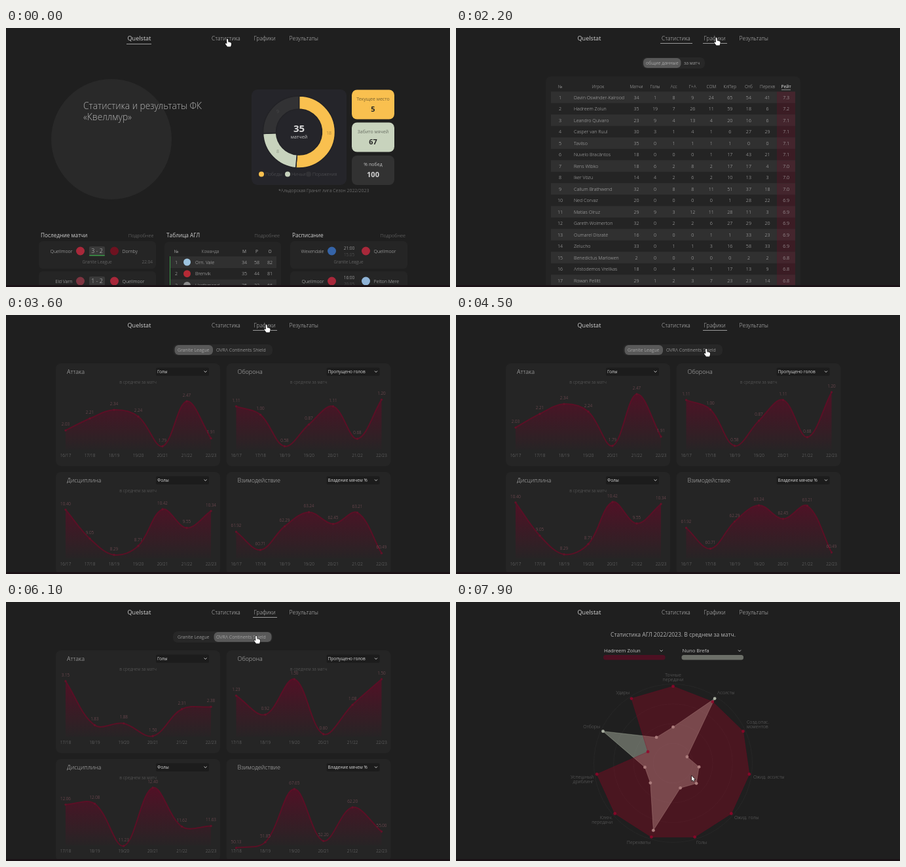
Recreate the animation shown at these times as an HTML page with a canvas. Size 678x396 px, loop 8 s.

```html
<!DOCTYPE html>
<html lang="ru">
<head>
<meta charset="utf-8">
<title>Quelstat</title>
<style>
  html, body { margin: 0; width: 100%; height: 100%; overflow: hidden; background: #1f1f1f; }
  canvas { display: block; width: 678px; height: 396px; }
</style>
</head>
<body>
<canvas></canvas>
<script>
const W = 678, H = 396, LOOP = 8000;
const canvas = document.querySelector('canvas');
const ctx = canvas.getContext('2d');
const dpr = window.devicePixelRatio || 1;
canvas.width = W * dpr;
canvas.height = H * dpr;

const CLUB = 'Quellmoor', LEAGUE = 'Granite League';
const GOLD = '#f9c04f', SAGE = '#c8d3bd', RED = '#a8283a';

const clamp = v => Math.max(0, Math.min(1, v));
const progress = (t, start, length) => clamp((t - start) / length);
const mix = (a, b, k) => a + (b - a) * k;
const outQuart = p => 1 - (1 - p) ** 4;
const inOut = p => p * p * (3 - 2 * p);

function text(str, x, y, size = 7.1, color = '#b8b8b8', align = 'left', weight = 300) {
  ctx.font = `${weight} ${size}px "Open Sans", "Noto Sans", sans-serif`;
  ctx.textAlign = align;
  ctx.textBaseline = 'alphabetic';
  ctx.fillStyle = color;
  ctx.fillText(str, x, y + size * 0.37);
}
const centered = (str, x, y, size, color, weight) => text(str, x, y, size, color, 'center', weight);

function box(x1, y1, x2, y2, color, radius = 0) {
  ctx.fillStyle = color;
  ctx.beginPath();
  ctx.roundRect(x1, y1, x2 - x1, y2 - y1, radius);
  ctx.fill();
}
function dot(x, y, r, color) {
  ctx.fillStyle = color;
  ctx.beginPath();
  ctx.arc(x, y, r, 0, Math.PI * 2);
  ctx.fill();
}
function ring(x, y, r, color, width) {
  ctx.strokeStyle = color;
  ctx.lineWidth = width;
  ctx.beginPath();
  ctx.arc(x, y, r, 0, Math.PI * 2);
  ctx.stroke();
}
function chevron(x, y) {
  ctx.strokeStyle = '#ccc';
  ctx.lineWidth = 1;
  ctx.beginPath();
  ctx.moveTo(x - 2, y - 1);
  ctx.lineTo(x, y + 1);
  ctx.lineTo(x + 2, y - 1);
  ctx.stroke();
}

/* ---------- header and pointer ---------- */

function drawNav(t) {
  text('Quelstat', 185.5, 15.7, 9.1, '#d2d2d2', 'left', 400);
  text('Статистика', 314, 15.7, 8.5, '#c6c6c6');
  text('Графики', 378.5, 15.7, 8.5, '#c6c6c6');
  text('Результаты', 432.5, 15.7, 8.5, '#c6c6c6');
  const underline = (x1, x2, y, start, end) => {
    if (t < start || t >= end) return;
    const half = (x2 - x1) / 2 * progress(t, start, 200);
    const mid = (x1 + x2) / 2;
    box(mid - half, y, mid + half, y + 1, '#9a9a9a');
  };
  underline(184, 222, 24, -200, 850);
  underline(312, 361, 23, 100, 3250);
  underline(377, 414, 23, 1950, 7310);
  underline(184, 222, 24, 6900, 7310);
}

const STOPS = [
  { start: 1550, end: 2200, x: 397.5, y: 14.5 },
  { start: 4050, end: 4500, x: 382, y: 51.5 },
  { start: 6250, end: 7100, x: 203, y: 16 },
];
const HAND = [[-1, 1], [0, 0], [1, 1], [1.4, 5], [4, 5.3], [6, 6.5], [6, 9], [5, 12], [0, 12], [-3, 8], [-2.6, 6.8], [-0.6, 7.6]];
const ARROW = [[0, 0], [0, 7.2], [1.6, 5.8], [2.7, 8.2], [3.8, 7.7], [2.8, 5.4], [5, 5.2]];

function drawPointer(t) {
  let x = 338, y = 16.5, shape = HAND;
  for (const s of STOPS) {
    const p = progress(t, s.start, s.end - s.start);
    x = mix(x, s.x, inOut(p));
    y = mix(y, s.y, inOut(p));
    if (p > 0.2 && p < 0.8) shape = ARROW;
  }
  if (t >= 7310) [x, y, shape] = [360, 266, ARROW];
  for (const click of [600, 3000, 5100]) {
    if (t >= click && t < click + 290) ring(x + 0.3, y + 0.5, 16.3, '#850b1c', 1.7);
  }
  ctx.beginPath();
  shape.forEach(([dx, dy]) => ctx.lineTo(x + dx, y + dy));
  ctx.closePath();
  ctx.lineWidth = 1.2;
  ctx.strokeStyle = '#111';
  ctx.stroke();
  ctx.fillStyle = '#fff';
  ctx.fill();
}

/* ---------- dashboard ---------- */

function drawDonut() {
  const cx = 447.5, cy = 159;
  let angle = -Math.PI / 2;
  box(375, 94, 520, 240, '#25252a', 9);
  for (const [count, color] of [[18, GOLD], [8, SAGE], [9, '#323234']]) {
    const end = angle + count / 35 * Math.PI * 2;
    ctx.beginPath();
    ctx.arc(cx, cy, 55, angle, end);
    ctx.arc(cx, cy, 35, end, angle, true);
    ctx.closePath();
    ctx.fillStyle = color;
    ctx.fill();
    ctx.strokeStyle = '#222226';
    ctx.lineWidth = 1.5;
    ctx.stroke();
    angle = end;
  }
  centered('18', 493, 160, 7, '#8a6c35');
  centered('8', 415, 188.5, 7, '#6c7266');
  centered('9', 415, 127, 7, '#555');
  centered('35', cx, 153, 15, '#d8d8d8', 700);
  centered('матчей', cx, 166, 7.1, '#c4c4c4', 400);
  [[390, GOLD, 'Победы'], [430, SAGE, 'Ничьи'], [462, '#323236', 'Поражения']].forEach(([x, color, name]) => {
    dot(x, 223.5, 4, color);
    text(name, x + 6, 223.5, 7, '#58585c');
  });
}

function statCard(y, color, label, value, labelColor, valueColor) {
  box(528, y, 593, y + 45, color, 8);
  centered(label, 560.5, y + 13.5, 7, labelColor, 400);
  centered(value, 560.5, y + 29, 11, valueColor, 700);
}

function matchCard(x, y, home, away, homeColor, awayColor) {
  box(x, y, x + 179, y + 42, '#252525', 6);
  text(home, x + 51.5, y + 15.5, 7.1, '#c8c8c8', 'right');
  text(away, x + 127.5, y + 15.5, 7.1, '#c8c8c8');
  dot(x + 63.5, y + 15, 6.5, homeColor);
  dot(x + 115.5, y + 15, 6.5, awayColor);
  centered(LEAGUE, x + 89, y + 32, 6.6, '#808080');
}
function score(y, value) {
  box(127, y - 7, 151, y + 7, '#3a3a3a', 2);
  box(127, y + 6, 151, y + 7.6, '#3c9a48', 1);
  centered(value, 139, y - 0.5, 8.8, '#d0d0d0');
}
function kickoff(y, time, date) {
  centered(time, 524, y - 5, 6.6, '#cccccc');
  centered(date, 524, y + 5, 6.4, '#626262');
}

function drawDashboard() {
  dot(161, 170, 92, '#292929');
  text('Статистика и результаты ФК', 118, 118.5, 13.8, '#b4b4b4');
  text('«Квеллмур»', 118, 136, 13.8, '#b4b4b4');
  drawDonut();
  statCard(94.5, GOLD, 'Текущее место', '5', '#77602f', '#242424');
  statCard(144.5, SAGE, 'Забито мячей', '67', '#6a7064', '#242424');
  statCard(195, '#323232', '% побед', '100', '#c0c0c0', '#d4d4d4');
  text('*Альдорская Гранит лига Сезон 2022/2023', 416, 248, 6.9, '#8e8e8e');

  [[53, 225.5, 'Последние матчи'], [245, 418, 'Таблица АГЛ'], [437, 610, 'Расписание']].forEach(([x, right, title]) => {
    text(title, x, 317, 8.3, '#cfcfcf', 'left', 400);
    text('Подробнее', right, 317.5, 7.3, '#787878', 'right');
  });

  matchCard(50, 326, CLUB, 'Dornby', RED, '#6e1220');
  matchCard(50, 372, 'Eld Varn', CLUB, '#7d3440', RED);
  score(341, '3 - 2');
  score(387, '1 - 2');
  text('22.04', 224, 358, 6.6, '#808080', 'right');
  matchCard(434, 326, 'Wexendale', CLUB, '#3564a8', RED);
  matchCard(434, 372, CLUB, 'Pelton Mere', RED, '#8fb3d6');
  kickoff(341.5, '21:00', '15.05');
  kickoff(387, '16:00', '20.05');

  box(242, 327, 420, 410, '#242424', 6);
  const cols = [260, 364, 383, 403];
  ['№', 'М', 'Р', 'О'].forEach((s, i) => centered(s, cols[i], 342, 6.6, '#a8a8a8', 400));
  centered('Команда', 312, 342, 6.6, '#b0b0b0');
  [['Orn. Vale', '#9cc3df', '34 58 82'], ['Brenvik', '#b52a35', '35 44 81'], ['Harthmond', '#8d8d8d', '35 32 66']].forEach(([team, color, points], i) => {
    const y = 358 + i * 17.7;
    if (i % 2 === 0) box(250, y - 8.8, 413, y + 8.9, '#303030');
    dot(276.5, y, 5.5, color);
    text(team, 289, y, 7.1, '#c8c8c8');
    [i + 1, ...points.split(' ')].forEach((v, c) => centered(v, cols[c], y, 7.1, '#c8c8c8'));
  });
  box(250, 349, 251, 396, '#3c9a48');
}

/* ---------- player table ---------- */

// name | matches, goals, assists, big chances, key passes, tackles, interceptions, rating
const PLAYERS = `Davin Oswinder-Kalrood|34 1 8 24 65 54 41 7.3
Hadreem Zolun|35 19 7 11 59 18 6 7.2
Leandro Quivaro|23 9 4 4 20 16 6 7.1
Casper van Ruul|30 3 1 1 6 27 29 7.1
Tavilso|35 0 1 1 1 0 0 7.1
Nuvelo Bracântos|18 0 0 1 17 43 21 7.1
Rens Wibko|18 6 2 2 17 17 4 7.0
Iker Vózu|14 4 2 2 10 13 3 7.0
Callum Brathwend|32 0 8 11 51 37 18 7.0
Ned Corvaz|20 0 0 0 1 28 22 6.9
Matías Olruz|29 9 3 11 28 11 3 6.9
Gareth Wolmerton|32 0 2 6 27 29 20 6.9
Oumarel Disraté|16 0 0 1 1 33 23 6.9
Zelucho|33 0 1 3 16 58 33 6.9
Benedictus Marlowen|2 0 0 0 0 2 2 6.8
Aristodemos Vrelikas|18 0 4 1 17 13 9 6.8
Rowan Pellitt|29 1 2 7 23 23 14 6.8`.split('\n').map(line => {
  const [name, stats] = line.split('|');
  const values = stats.split(' ');
  values.splice(3, 0, +values[1] + +values[2]);
  return { name, values };
});

function toggle(left, right, active, labels) {
  box(left, 45, right, 62, '#272727', 7);
  box(active[0], 46, active[1], 61, '#595959', 6);
  labels.forEach(([label, x]) => text(label, x, 53.5, 7.1, '#cccccc'));
}

function drawTable() {
  toggle(284, 380, [286, 343.5], [['общие данные', 290], ['за матч', 348]]);
  box(137, 74, 526, 410, '#242424', 8);
  const colX = i => 275.5 + i * 28.57;
  const rowH = 17.5;
  centered('№', 159, 90, 6.6, '#b8b8b8');
  centered('Игрок', 217, 90, 6.6, '#b8b8b8');
  'Матчи Голы Асс Г+А СОМ КлПер Отб Перехв Рейт'.split(' ').forEach((s, i) =>
    centered(s, colX(i), 90, 6.6, i === 8 ? '#e4e4e4' : '#b8b8b8', i === 8 ? 400 : 300));
  box(497, 94, 511, 94.6, '#ccc');
  PLAYERS.forEach(({ name, values }, i) => {
    const y = 106 + i * rowH;
    if (i % 2 === 0) box(145, y - rowH / 2, 518, y + rowH / 2, '#303030');
    box(490, y - rowH / 2, 518, y + rowH / 2, 'rgba(110,15,40,.32)');
    centered(i + 1, 159, y, 7.1, '#bcbcbc');
    text(name, 180, y, 7.1, '#bcbcbc');
    values.forEach((v, c) => centered(v, colX(c), y, 7.1, '#bcbcbc'));
  });
}

/* ---------- line charts ---------- */

// Each season set: values followed by the heights of its lowest and highest point.
const CHARTS = [
  { x: 76, y: 74, title: 'Аттака', metric: 'Голы', average: true, sets: [
    { values: [2.03, 2.21, 2.34, 2.24, 1.79, 2.47, 1.91], low: 126, high: 47 },
    { values: [3.15, 1.83, 1.88, 1.5, 2.31, 2.38], low: 131, high: 47 }] },
  { x: 336.5, y: 74, title: 'Оборона', metric: 'Пропущено голов', average: true, sets: [
    { values: [1.11, 1, 0.58, 0.87, 1.11, 0.68, 1.2], low: 126, high: 44 },
    { values: [1.23, 0.92, 1.5, 0.6, 1.08, 1.5], low: 128, high: 44 }] },
  { x: 76, y: 240, title: 'Дисциплина', metric: 'Фолы', average: true, sets: [
    { values: [10.4, 9.05, 8.29, 8.71, 10.42, 9.55, 10.34], low: 126, high: 46 },
    { values: [12.06, 12.08, 11.23, 12.4, 11.62, 11.63], low: 133, high: 44 }] },
  { x: 336.5, y: 240, title: 'Взимодействие', metric: 'Владение мячем %', sets: [
    { values: [61.92, 60.71, 62.29, 63.24, 62.45, 63.21, 60.49], low: 123, high: 51 },
    { values: [50.13, 51.85, 67.65, 52.2, 62.2, 55], low: 136, high: 46 }] },
];
const CHART_BASE = 132;

function setPoints({ values, low, high }) {
  const min = Math.min(...values), max = Math.max(...values);
  return values.map((v, i) => ({
    x: 15 + 222 * i / (values.length - 1),
    y: mix(low, high, (v - min) / (max - min)),
  }));
}

function splinePath(pts) {
  const tension = 0.36;
  const handles = pts.map((p, i) => {
    const a = pts[i - 1] || p, b = pts[i + 1] || p;
    const da = Math.hypot(p.x - a.x, p.y - a.y), db = Math.hypot(b.x - p.x, b.y - p.y);
    const before = tension * da / (da + db), after = tension * db / (da + db);
    return {
      inX: p.x - before * (b.x - a.x), inY: p.y - before * (b.y - a.y),
      outX: p.x + after * (b.x - a.x), outY: p.y + after * (b.y - a.y),
    };
  });
  ctx.beginPath();
  ctx.moveTo(pts[0].x, pts[0].y);
  for (let i = 1; i < pts.length; i++) {
    const from = handles[i - 1], to = handles[i];
    ctx.bezierCurveTo(from.outX, from.outY, to.inX, to.inY, pts[i].x, pts[i].y);
  }
}

function drawChart(chart, second, t) {
  ctx.save();
  ctx.translate(chart.x, chart.y);
  box(0, 0, 251, 157, '#252525', 8);
  text(chart.title, 17, 12.5, 9, '#c0c0c0');
  box(153, 6.5, 234, 19, '#1c1c1c', 2);
  text(chart.metric, 155, 12.8, 6.5, '#d6d6d6', 'left', 500);
  chevron(228.5, 12.5);
  if (chart.average) centered('в среднем за матч', 125.5, 28.5, 6.6, '#666');

  const set = chart.sets[second ? 1 : 0];
  const origin = setPoints(chart.sets[0]);
  const k = outQuart(progress(t, second ? 5200 : 3200, 1000));
  const pts = setPoints(set).map((p, i) => second
    ? { x: mix(origin[i].x, p.x, k), y: mix(origin[i].y, p.y, k) }
    : { x: p.x, y: mix(CHART_BASE, p.y, k) });

  const fill = ctx.createLinearGradient(0, 44, 0, CHART_BASE);
  fill.addColorStop(0, 'rgba(92,12,38,.8)');
  fill.addColorStop(1, 'rgba(92,12,38,.04)');
  splinePath(pts);
  ctx.strokeStyle = '#5a1025';
  ctx.lineWidth = 2;
  ctx.stroke();
  ctx.lineTo(pts[pts.length - 1].x, CHART_BASE);
  ctx.lineTo(pts[0].x, CHART_BASE);
  ctx.fillStyle = fill;
  ctx.fill();

  const firstYear = second ? 17 : 16;
  pts.forEach((p, i) => {
    dot(p.x, p.y, 1.7, '#621128');
    centered(set.values[i].toFixed(2), p.x, p.y - 9.5, 6.3, '#86545e');
    centered(`${firstYear + i}/${firstYear + i + 1}`, 15 + 222 * i / (pts.length - 1), 141, 6.3, '#767676');
  });
  ctx.restore();
}

function drawCharts(t) {
  const second = t >= 5210;
  toggle(255, 407, second ? [317.5, 405.5] : [257.5, 316],
    [[LEAGUE, 262], ['OVRA Continents Shield', 321]]);
  CHARTS.forEach(chart => drawChart(chart, second, t));
}

/* ---------- player comparison ---------- */

const RADAR = { x: 331.5, y: 246.5, r: 121 };
const SKILLS = [
  ['Точные|передачи', 331.5, 111, 'center'], ['Ассисты', 399, 138, 'left'],
  ['Созд.опас.|моментов', 444, 183, 'left'], ['Ожид. ассисты', 454, 267, 'left'],
  ['Ожид. голы', 425, 329, 'left'], ['Голы', 367, 367, 'left'],
  ['Перехваты', 297, 367, 'right'], ['Ключ.|передачи', 239, 329, 'right'],
  ['Успешный|дриблинг', 210, 267, 'right'], ['Отборы', 220, 190.5, 'right'],
  ['Удары', 265, 138, 'right'],
];
const FIRST = [1, 0.95, 1, 1, 1, 1, 1, 1, 1, 0.36, 1];
const SECOND = [0.47, 1, 0.2, 0.34, 0.4, 0.335, 0.91, 0.39, 0.37, 1, 0.4];

function radarShape(values, scale, fill, stroke, pointColor) {
  const pts = values.map((v, i) => {
    const a = i / values.length * Math.PI * 2, r = RADAR.r * v * scale;
    return [RADAR.x + Math.sin(a) * r, RADAR.y - Math.cos(a) * r];
  });
  ctx.beginPath();
  pts.forEach(p => ctx.lineTo(...p));
  ctx.closePath();
  ctx.fillStyle = fill;
  ctx.fill();
  ctx.strokeStyle = stroke;
  ctx.lineWidth = 1;
  ctx.stroke();
  pts.forEach(p => dot(...p, 2.4, pointColor));
}

function drawRadar(t) {
  centered('Статистика АГЛ 2022/2023. В среднем за матч.', 331.5, 49.5, 8.5, '#b4b4b4', 400);
  [[226, 'Hadreem Zolun', '#4d1022'], [345.5, 'Nuno Brefa', '#6c6f68']].forEach(([x, name, color]) => {
    text(name, x, 74.5, 7.7, '#c4c4c4', 'left', 400);
    chevron(x + 87.5, 74.5);
    box(x - 1, 81, x + 93.5, 88.5, color, 3.5);
  });
  for (let i = 1; i <= 4; i++) ring(RADAR.x, RADAR.y, RADAR.r * i / 4, '#292929', 0.8);
  for (const [label, x, y, align] of SKILLS) {
    label.split('|').forEach((line, i) => text(line, x, y + i * 7.4, 7, '#686868', align));
  }
  const scale = outQuart(progress(t, 7310, 1000));
  radarShape(SECOND, scale, 'rgba(200,211,189,.4)', 'rgba(200,211,189,.35)', '#aab0a2');
  radarShape(FIRST, scale, 'rgba(172,0,34,.3)', 'rgba(130,8,38,.35)', 'rgba(150,4,42,.8)');
}

/* ---------- playback ---------- */

const PAGES = [
  { start: -1000, draw: drawDashboard },
  { start: 800, draw: drawTable },
  { start: 3200, draw: drawCharts },
  { start: 7310, draw: drawRadar },
];

function render(t) {
  ctx.setTransform(dpr, 0, 0, dpr, 0, 0);
  ctx.globalAlpha = 1;
  box(0, 0, W, H, '#1f1f1f');
  const page = PAGES.filter(p => t >= p.start).pop();
  ctx.globalAlpha = progress(t, page.start, 350);
  page.draw(t);
  ctx.globalAlpha = 1;
  box(0, 393, W, H, '#1b1216');
  drawNav(t);
  drawPointer(t);
}

function frame() {
  render(performance.now() % LOOP);
  requestAnimationFrame(frame);
}
frame();
</script>
</body>
</html>
```
